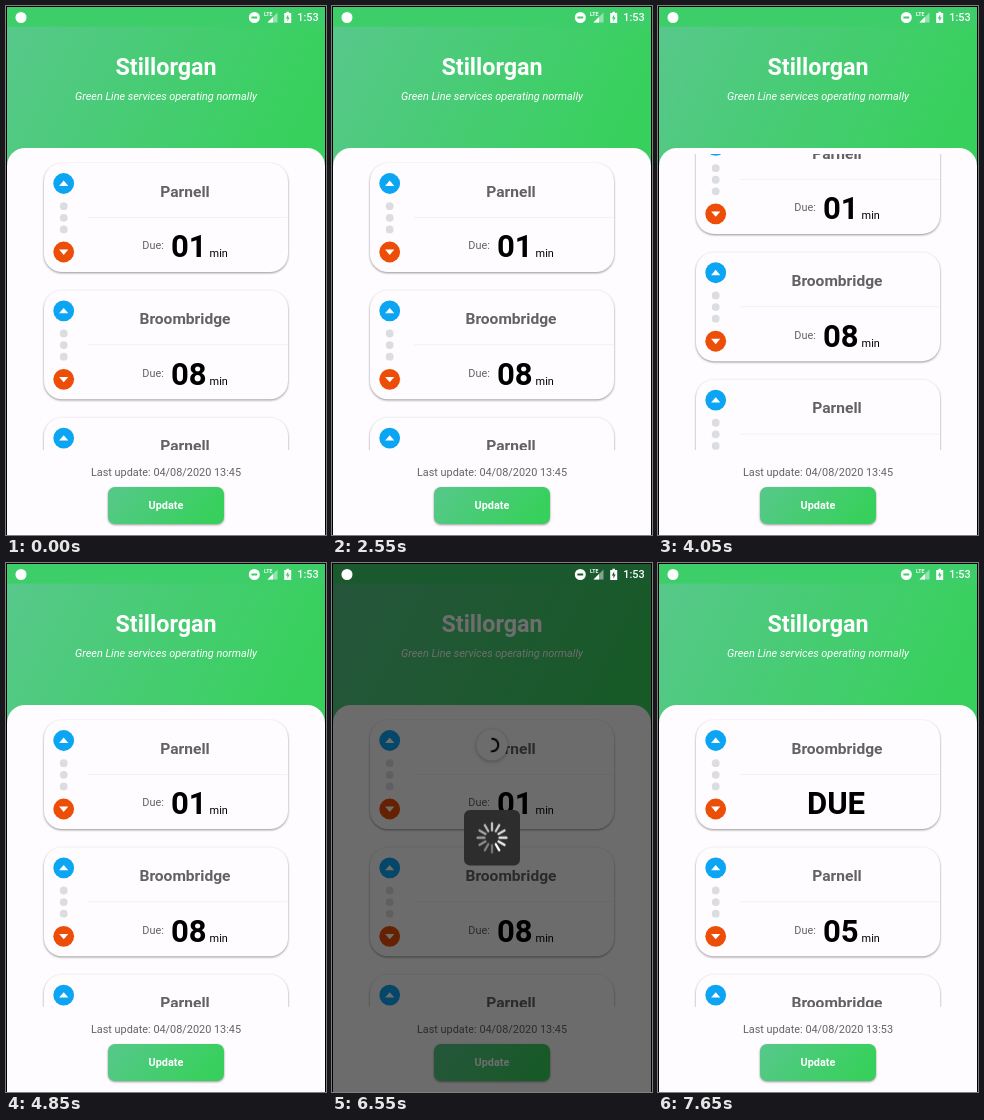
An HTML page that plays this animation: 320x529 px, repeating every 8 s.

```html
<!DOCTYPE html>
<html lang="en">
<head>
<meta charset="utf-8">
<title>Tram times</title>
<style>
  html, body { margin: 0; width: 100%; height: 100%; overflow: hidden; background: #000; }
  svg { display: block; width: 100vw; height: 100vh; font: 10.89px Roboto, sans-serif; }
  text { white-space: pre; }
  .mid { text-anchor: middle; }
  .bold { font-weight: 700; }
  .title { font-size: 23.33px; }
  .stop { font-size: 15.56px; fill: #636163; }
  .big { font-size: 31.1px; }
  .grey { fill: #656365; }
  .card > rect { fill: #fefcfe; filter: drop-shadow(0 1.2px 1.2px rgba(0, 0, 0, .42)); }

  .scroll, .before, .after, .pull, .arc, .dim, .loader { animation: 8s linear infinite; }
  .scroll { animation-name: scroll; animation-timing-function: cubic-bezier(.37, 0, .63, 1); }
  .before { animation-name: before; animation-timing-function: step-end; }
  .after { animation-name: after; animation-timing-function: step-end; }
  .pull { animation-name: pull; animation-timing-function: ease-in-out; }
  .disc { filter: drop-shadow(0 1px 2px rgba(0, 0, 0, .3)); }
  .arc { animation-name: turn, sweep; }
  .dim { animation-name: dim; }
  .loader { animation-name: loader; }
  .spokes { animation: spokes 1s steps(12) infinite; }

  /* two quick swipes up and back */
  @keyframes scroll {
    0%, 19.375%, 30%, 43.125%, 53.75%, 100% { transform: translateY(0); }
    24.6875% { transform: translateY(-64px); }
    48.4375% { transform: translateY(-60px); }
  }
  @keyframes before { 0% { opacity: 1; } 83.75%, 100% { opacity: 0; } }
  @keyframes after { 0% { opacity: 0; } 83.75%, 100% { opacity: 1; } }
  @keyframes pull {
    0%, 67.5% { transform: translate(160px, 128px); }
    72.5%, 75% { transform: translate(160px, 206px); }
    78.125%, 83.74% { transform: translate(160px, 182px); }
    83.75%, 100% { transform: translate(160px, 128px); }
  }
  @keyframes turn { from { transform: rotate(-63.5deg); } to { transform: rotate(2096.5deg); } }
  @keyframes sweep {
    0%, 67.5% { stroke-dasharray: 10 360; }
    73%, 75% { stroke-dasharray: 285 360; }
    78.125% { stroke-dasharray: 80 360; }
    81.875% { stroke-dasharray: 195 360; }
    83.75%, 100% { stroke-dasharray: 250 360; }
  }
  @keyframes dim {
    0%, 78.125% { opacity: 0; }
    81.25% { opacity: .57; }
    83.75% { opacity: .57; animation-timing-function: cubic-bezier(.25, .46, .45, .94); }
    88.125%, 100% { opacity: 0; }
  }
  @keyframes loader {
    0%, 78.125% { opacity: 0; }
    81.25%, 83.74% { opacity: 1; }
    83.75%, 100% { opacity: 0; }
  }
  @keyframes spokes { to { transform: rotate(360deg); } }
</style>
</head>
<body>
<svg viewBox="0 0 320 529" preserveAspectRatio="none">
  <defs>
    <linearGradient id="green" x1="0" y1="0" x2="1" y2=".25">
      <stop offset="0" stop-color="#57c88b"/>
      <stop offset="1" stop-color="#38d05d"/>
    </linearGradient>
    <clipPath id="view"><rect x="1" y="148" width="318" height="296"/></clipPath>
    <clipPath id="screen"><rect x="1" y="1" width="318" height="528"/></clipPath>
    <g id="arrow">
      <circle r="10.4"/>
      <path d="M-4.6 2.4L0-2.9 4.6 2.4Z" fill="#fff"/>
    </g>
  </defs>

  <g clip-path="url(#screen)">
    <rect x="1" y="20" width="318" height="160" fill="url(#green)"/>
    <rect x="1" y="1" width="318" height="19.5" fill="#3dcd69"/>
    <text class="title bold mid" x="160" y="68.5" fill="#fff">Stillorgan</text>
    <text class="mid" x="160" y="94" fill="#fff" font-style="italic">Green Line services operating normally</text>
    <rect x="1" y="142" width="318" height="420" rx="18" fill="#fefcfe"/>

    <g clip-path="url(#view)">
      <g class="scroll">
        <g class="before" id="before"></g>
        <g class="after" id="after"></g>
      </g>
      <g class="pull">
        <circle class="disc" r="15.5" fill="#fdfbfd"/>
        <circle class="arc" r="6.3" pathLength="360" fill="none" stroke="#000" stroke-width="2"/>
      </g>
    </g>

    <text class="grey mid before" x="160" y="469.7">Last update: 04/08/2020 13:45</text>
    <text class="grey mid after" x="160" y="469.7">Last update: 04/08/2020 13:53</text>
    <rect x="102" y="481" width="116" height="37" rx="7" fill="url(#green)" style="filter:drop-shadow(0 1.2px 1.3px rgba(0,0,0,.4))"/>
    <text class="bold mid" x="160" y="503.3" fill="#fff">Update</text>

    <rect class="dim" width="320" height="529"/>
    <g class="loader">
      <rect x="132" y="247" width="56" height="55.5" rx="6" fill="#2d2d2d"/>
      <g transform="translate(160 274.7)"><g class="spokes" id="spokes"></g></g>
    </g>

    <!-- status bar icons stay above the dimming -->
    <g fill="#fff" fill-rule="evenodd">
      <circle cx="15" cy="11.5" r="5.5"/>
      <path d="M242.8 11.5a5.5 5.5 0 1 0 11 0a5.5 5.5 0 1 0-11 0ZM245.4 10.6h5.8v1.8h-5.8Z"/>
      <text x="258" y="9.8" font-size="5.2" font-weight="700">LTE</text>
      <path d="M271.5 6.5V16.5H261.5Z" opacity=".45"/>
      <path d="M267 11V16.5H261.5Z"/>
      <path d="M280.4 5.8h2.6v1.2h2.2v10h-7v-10h2.2ZM282.2 8.6l-2.4 4h1.6v2.9l2.3-4.1h-1.5Z"/>
      <text x="291.3" y="15.4" font-weight="500">1:53</text>
    </g>
  </g>
</svg>
<script>
  const PITCH = 127.3;
  const byId = id => document.getElementById(id);

  const dueText = mins => mins === 0
    ? '<text class="big bold mid" x="178" y="251.3">DUE</text>'
    : `<text class="grey" x="136.3" y="243.3">Due:</text>
       <text class="big bold" x="165" y="251.3">${String(mins).padStart(2, '0')}</text>
       <text x="203.6" y="251.3">min</text>`;

  const card = ([stop, mins], i) => `
    <g class="card" transform="translate(0 ${i * PITCH})">
      <rect x="38" y="157" width="244" height="109" rx="18"/>
      <path d="M82 211.5H281.5" stroke="#f3f1f3"/>
      <use href="#arrow" x="57.7" y="177.5" fill="#0ba5f3"/>
      ${[200.2, 211.8, 223.4].map(y => `<circle cx="57.7" cy="${y}" r="3.9" fill="#dcdde1"/>`).join('')}
      <use href="#arrow" transform="translate(57.7 246) rotate(180)" fill="#ec4e08"/>
      <text class="stop bold mid" x="179" y="190.8">${stop}</text>
      ${dueText(mins)}
    </g>`;

  const fill = (id, trams) => { byId(id).innerHTML = trams.map(card).join(''); };
  fill('before', [['Parnell', 1], ['Broombridge', 8], ['Parnell', 13]]);
  fill('after', [['Broombridge', 0], ['Parnell', 5], ['Broombridge', 12]]);

  byId('spokes').innerHTML = Array.from({ length: 12 }, (_, i) =>
    `<path d="M0-7.5V-14.5" transform="rotate(${i * 30})" stroke="#fff" stroke-width="2.3"
      stroke-linecap="round" opacity="${0.35 + 0.65 * i / 11}"/>`).join('');
</script>
</body>
</html>
```
